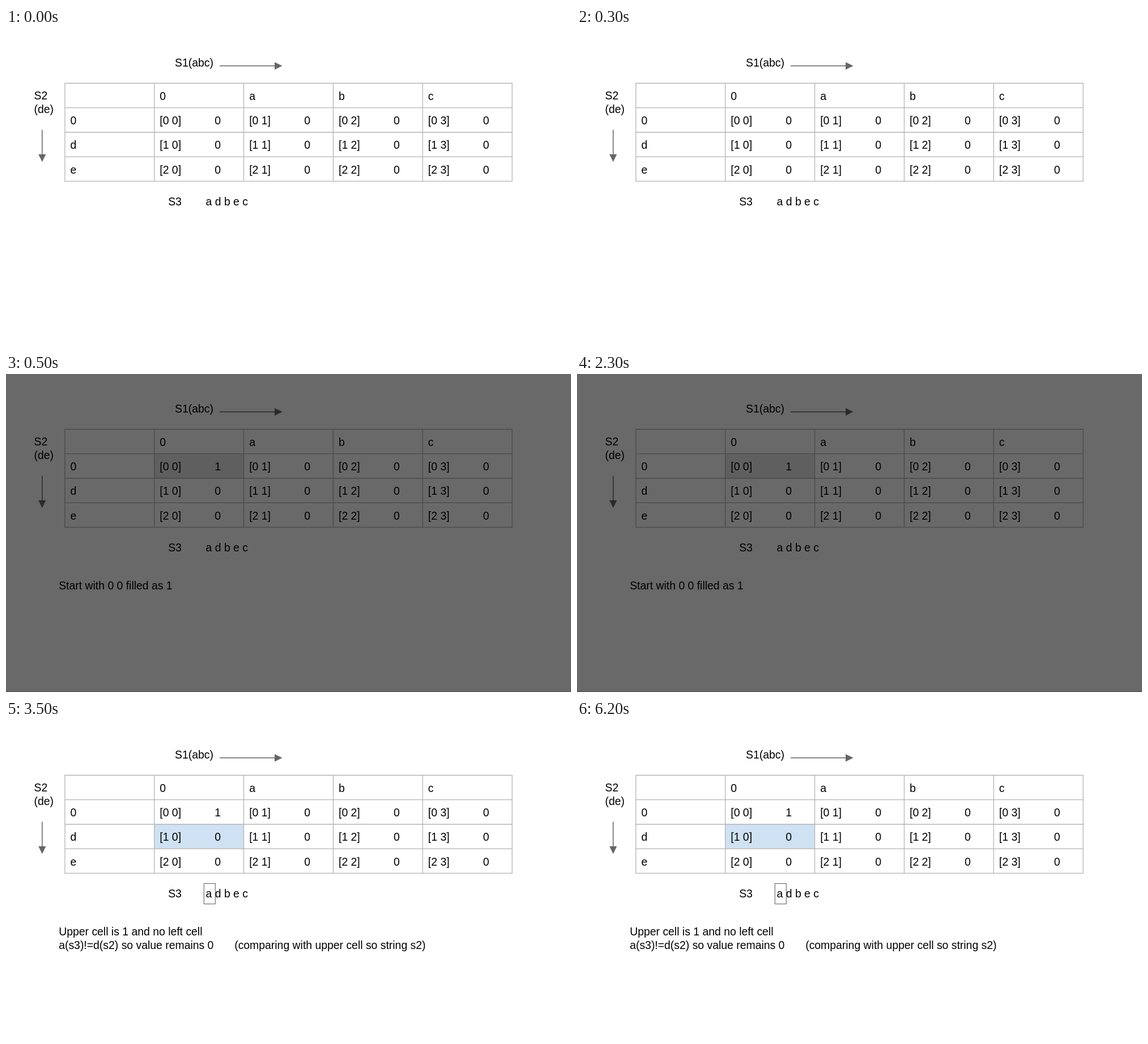
An HTML page that plays this animation: 997x561 px, repeating every 8 s.

```html
<!DOCTYPE html>
<html lang="en">
<head>
<meta charset="utf-8">
<title>Interleaving table</title>
<style>
  html, body { margin: 0; width: 100%; height: 100%; overflow: hidden; background: #fff; }
  svg { display: block; width: 100%; height: 100%; }
  text { font: 19.4px "Liberation Sans", Arial, sans-serif; white-space: pre; fill: #000; }
  .grid { fill: none; stroke: #b4b4b4; stroke-width: 1.3; }
  .arrow { fill: #666; stroke: none; }
  .shaft { stroke: #666; stroke-width: 1.5; }
  .backdrop { fill: #fff; }

  /* Hard cuts: blank table, dimmed first step, second step */
  .backdrop, .grid, .arrow, .shaft, .blank, .first, .second, .filled {
    animation: 8s step-end infinite;
  }
  .backdrop { animation-name: dim-page; }
  .grid { animation-name: dim-grid; }
  .arrow, .shaft { animation-name: dim-arrow; }
  .blank { animation-name: blank; }
  .first { animation-name: first; }
  .second { animation-name: second; }
  .filled { animation-name: filled; }
  @keyframes dim-page { 6.25% { fill: #696969; } 43.75%, 100% { fill: #fff; } }
  @keyframes dim-grid { 6.25% { stroke: #4a4a4a; } 43.75%, 100% { stroke: #b4b4b4; } }
  @keyframes dim-arrow { 6.25% { fill: #2a2a2a; stroke: #2a2a2a; } 43.75%, 100% { fill: #666; stroke: #666; } }
  @keyframes blank { 0% { visibility: visible; } 6.25%, 100% { visibility: hidden; } }
  @keyframes first { 0% { visibility: hidden; } 6.25% { visibility: visible; } 43.75%, 100% { visibility: hidden; } }
  @keyframes second { 0% { visibility: hidden; } 43.75%, 100% { visibility: visible; } }
  @keyframes filled { 0% { visibility: hidden; } 6.25%, 100% { visibility: visible; } }
  .arrow { stroke-width: 0; }
</style>
</head>
<body>
<svg viewBox="0 0 997 561">
  <rect class="backdrop" width="997" height="561"/>
  <rect class="first" x="261.7" y="140.7" width="157.8" height="43.3" fill="#5f5f5f"/>
  <rect class="second" x="261.7" y="184" width="157.8" height="43.2" fill="#cfe2f3"/>
  <path class="grid" d="M103.9 97.5H893.1V270.4H103.9ZM103.9 140.7H893.1M103.9 184H893.1M103.9 227.2H893.1M261.7 97.5V270.4M419.5 97.5V270.4M577.4 97.5V270.4M735.2 97.5V270.4"/>

  <path class="shaft" d="M377 66.8H475M63.8 179.5V224"/>
  <path class="arrow" d="M474 60.2L487.5 66.8L474 73.4ZM57.2 222.8L63.8 236.3L70.4 222.8Z"/>

  <text x="298" y="68">S1(abc)</text>
  <text x="49.5" y="126.3">S2</text>
  <text x="49.5" y="149.6">(de)</text>
  <text x="286.2" y="312.5">S3</text>
  <text x="352.6" y="312.5">a d b e c</text>
  <g id="cells"></g>

  <text class="first" x="93.2" y="380.2">Start with 0 0 filled as 1</text>
  <rect class="first" y="560" width="997" height="1" fill="#4a4a4a"/>
  <g class="second">
    <rect x="349.3" y="288.5" width="20" height="36" fill="none" stroke="#666" stroke-width="1.1"/>
    <text x="93.2" y="380.2">Upper cell is 1 and no left cell</text>
    <text x="93.2" y="403.5">a(s3)!=d(s2) so value remains 0</text>
    <text x="403.2" y="403.5">(comparing with upper cell so string s2)</text>
  </g>
</svg>
<script>
  const cells = document.getElementById('cells');
  const columnX = col => 271.3 + col * 157.85;
  const rowY = row => 170 + row * 43.3;

  function label(x, y, content, className = '') {
    const text = document.createElementNS('http://www.w3.org/2000/svg', 'text');
    text.setAttribute('x', x);
    text.setAttribute('y', y);
    text.setAttribute('class', className);
    text.textContent = content;
    cells.append(text);
  }

  [...'0abc'].forEach((name, col) => label(columnX(col), rowY(-1), name));
  [...'0de'].forEach((name, row) => {
    label(113.4, rowY(row), name);
    for (let col = 0; col < 4; col++) {
      const origin = row + col === 0;
      label(columnX(col), rowY(row), `[${row} ${col}]`);
      label(columnX(col) + 97, rowY(row), '0', origin ? 'blank' : '');
      if (origin) label(columnX(col) + 97, rowY(row), '1', 'filled');
    }
  });
</script>
</body>
</html>
```
